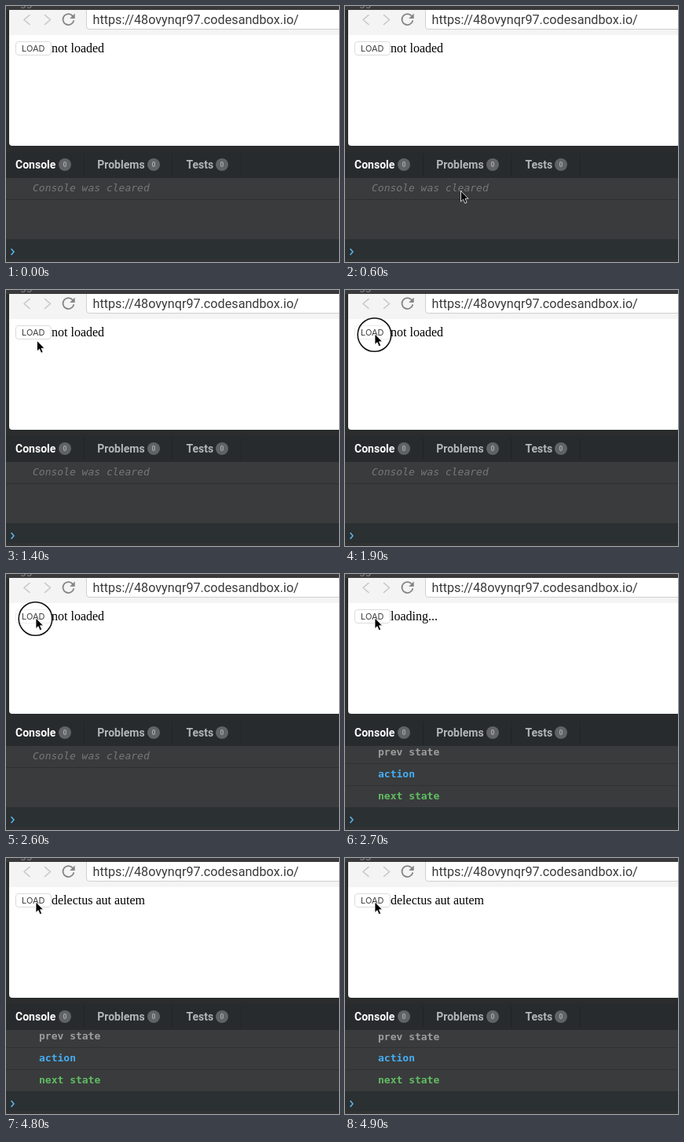
An HTML page that plays this animation: 424 px wide and 326 px high, repeating every 5900 ms.

```html
<!DOCTYPE html>
<html lang="en">
<head>
<meta charset="utf-8">
<title>Load demo</title>
<style>
html, body { margin: 0; width: 100%; height: 100%; overflow: hidden; background: #2b2c2e; }
svg { display: block; width: 424px; height: 326px; }
text { white-space: pre; }
.ui { font-family: Roboto, sans-serif; }
.tab { font: 700 14px Roboto, sans-serif; fill: #b4b7b9; }
.count { font: 700 8.5px Roboto, sans-serif; fill: #a5a7a8; text-anchor: middle; }
.page { font: 16px "Liberation Serif", serif; fill: #000; }
.log { font: 700 13px "DejaVu Sans Mono", monospace; }
.cleared { font: italic 13px "DejaVu Sans Mono", monospace; fill: #77787a; }
.line { fill: none; stroke-linecap: round; stroke-linejoin: round; }
</style>
</head>
<body>
<svg viewBox="0 0 424 326">
  <defs><clipPath id="console"><rect y="219" width="424" height="78"/></clipPath></defs>

  <rect width="424" height="326" fill="#2b2c2e"/>
  <rect width="424" height="5" fill="#39383a"/>
  <text class="ui" x="18" y="0" font-size="14" fill="#858587">gger</text>

  <!-- browser -->
  <path d="M4 5H424V178H8Q4 178 4 174Z" fill="#fff"/>
  <rect x="4" y="5" width="420" height="32" fill="#f4f4f4"/>
  <path d="M102.5 5V26Q102.5 29.5 106 29.5H425V5" fill="#fff" stroke="#d0d0d0"/>
  <path class="line" d="M30 11.5L23 17.5L30 23.5M49.5 11.5L56.5 17.5L49.5 23.5" stroke="#c6c6c6" stroke-width="1.6"/>
  <path class="line" d="M85.200 13A7 7 0 1 0 86.200 19" stroke="#858585" stroke-width="1.8"/>
  <path d="M87.700 9.500V16H81.200Z" fill="#858585"/>
  <text class="ui" x="110.500" y="23" font-size="16.200" fill="#3a3a3a">https://48ovynqr97.codesandbox.io/</text>

  <rect id="button" x="12.5" y="45.5" width="45" height="17" rx="3.5" fill="#fff" stroke="#dcdcdc"/>
  <text x="20" y="58" font-family="Inter, sans-serif" font-size="11" fill="#3c3c3c">LOAD</text>
  <text id="status" class="page" x="58" y="59"></text>

  <!-- developer tools -->
  <rect y="186" width="424" height="33" fill="#272b2d"/>
  <g id="tabs"></g>
  <rect y="219" width="424" height="78" fill="#3a3b3c"/>
  <g clip-path="url(#console)">
    <g id="empty">
      <rect y="246" width="424" height="1" fill="#2f3031"/>
      <text class="cleared" x="34" y="236">Console was cleared</text>
    </g>
    <g id="entries">
      <path d="M0 241.5H424M0 269.5H424" stroke="#2f3031"/>
      <text id="prev" class="log" x="42" y="231" fill="#9c9d9e">prev state</text>
      <text class="log" x="42" y="259" fill="#45aef5">action</text>
      <text class="log" x="42" y="287" fill="#60bd63">next state</text>
    </g>
  </g>
  <rect y="297" width="424" height="25" fill="#2b3032"/>
  <rect y="322" width="424" height="4" fill="#303234"/>
  <path class="line" d="M7 309.5L10 313L7 316.5" stroke="#5ab4ea" stroke-width="1.6"/>

  <circle id="ring" cx="37.5" cy="57" r="21.300" fill="none" stroke="#111" stroke-width="1.6"/>
  <path id="cursor" d="M.5 .5V14L3.600 11.200L5.700 16.200L8.100 15.200L6 10.300H10Z" fill="#000" stroke="#fff" stroke-width=".8"/>
</svg>
<script>
const LOOP = 5900;
const $ = id => document.getElementById(id);

// Each step: start time, value
const cursorSteps = [
  [0, null], [500, [163, 268]], [600, [147, 235]], [700, [114, 182]],
  [800, [80, 133]], [900, [63, 109]], [1100, [60, 97]], [1200, [53, 84]],
  [1300, [45, 72]], [1400, [39, 64]], [1500, [37, 61]], [1700, [37.5, 55.5]]
];
const statusSteps = [[0, "not loaded"], [2700, "loading..."], [4800, "delectus aut autem"]];
const ringSteps = [[0, false], [1900, true], [2100, false], [2600, true], [2700, false]];

const valueAt = (steps, t) => steps.findLast(([start]) => start <= t)[1];
const show = (id, on) => $(id).setAttribute("visibility", on ? "visible" : "hidden");

const tabs = [["Console", 12, 75, 99], ["Problems", 116.3, 188, 211], ["Tests", 229.4, 275, 299]];
$("tabs").innerHTML = tabs.map(([name, x, badge, edge], i) => `
  <text class="tab" x="${x}" y="207"${i ? "" : ' style="fill:#fff"'}>${name}</text>
  <circle cx="${badge}" cy="202" r="8" fill="#606365"/>
  <text class="count" x="${badge}" y="205">0</text>
  <rect x="${edge}" y="188" width="1" height="29" fill="#212527"/>`).join("");

function draw(t) {
  const point = valueAt(cursorSteps, t);
  show("cursor", point);
  if (point) $("cursor").setAttribute("transform", `translate(${point})`);

  const pressed = valueAt(ringSteps, t);
  show("ring", pressed);
  $("button").setAttribute("stroke-opacity", pressed ? .5 : 1);

  $("status").textContent = valueAt(statusSteps, t);
  show("empty", t < 2700);
  show("entries", t >= 2700);
  $("prev").setAttribute("y", t < 4900 ? 231 : 232);
}

const begin = performance.now();
function tick() {
  draw((performance.now() - begin) % LOOP);
  requestAnimationFrame(tick);
}
tick();
</script>
</body>
</html>
```
